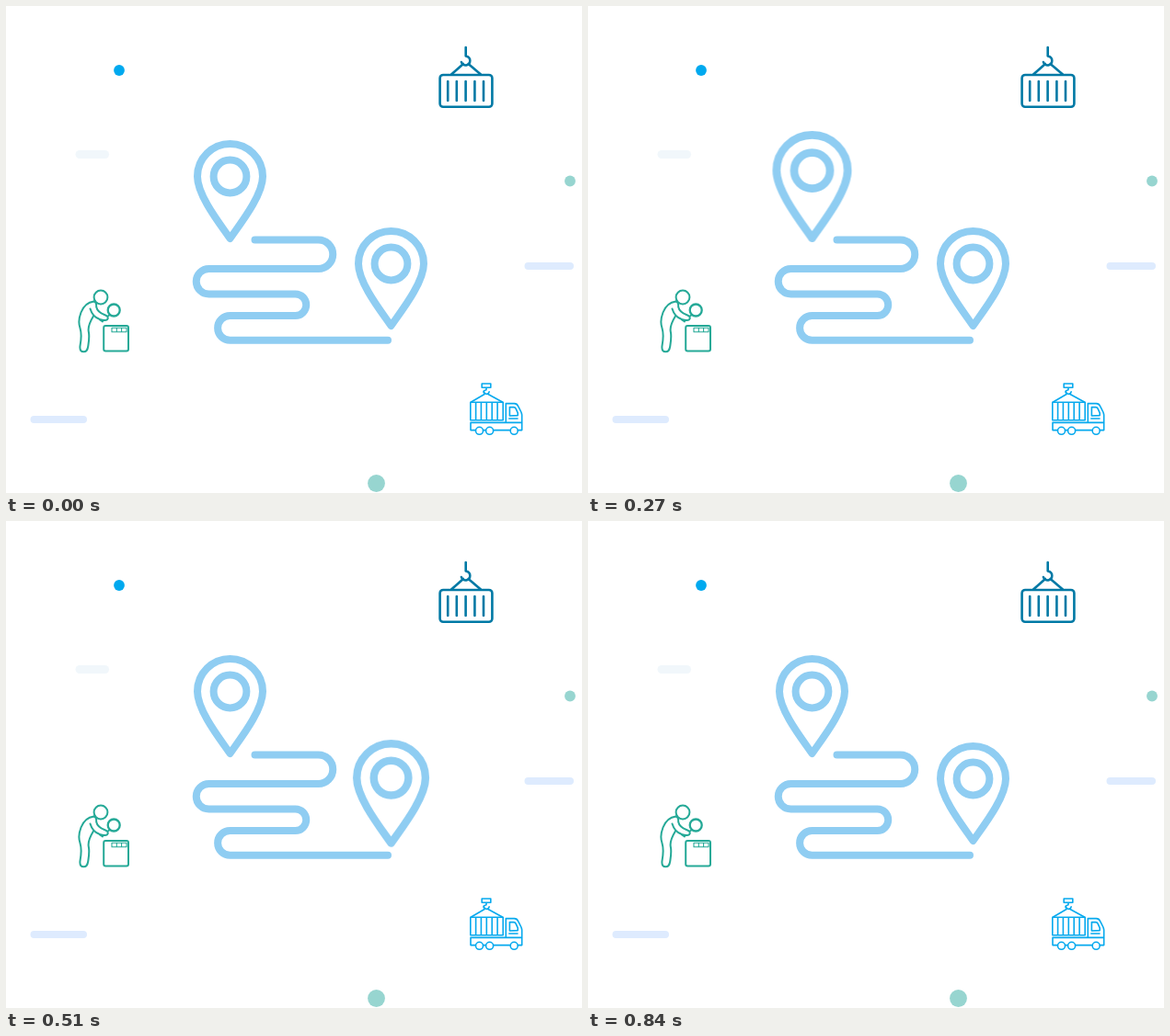
These frames come from a looping animation (626 px wide and 530 px high, 870 ms). An HTML page:

```html
<!DOCTYPE html>
<html lang="en">
<head>
<meta charset="utf-8">
<title>Delivery route</title>
<style>
  html, body { margin: 0; width: 100%; height: 100%; overflow: hidden; background: #fff; }
  svg { display: block; width: 626px; height: 530px; }
  .line { fill: none; stroke-linecap: round; stroke-linejoin: round; }
  .route { stroke: #8fcdf2; stroke-width: 8; }
  .crate { stroke: #0079a5; stroke-width: 2.6; }
  .worker { stroke: #25a997; stroke-width: 2; }
  .truck { stroke: #06a9ee; stroke-width: 1.6; }
  .from, .to { animation: 870ms infinite; }
  .from { transform-origin: 243.5px 257px; animation-name: from; }
  .to { transform-origin: 418.5px 297px; animation-name: to; }

  /* each pulse is half a sine wave: sine-out up, sine-in down */
  @keyframes from {
    0%, 1.72% { transform: scale(1); animation-timing-function: cubic-bezier(.39, .575, .565, 1); }
    24.25% { transform: scale(1.1); animation-timing-function: cubic-bezier(.47, 0, .745, .715); }
    46.8%, 100% { transform: scale(1); }
  }
  @keyframes to {
    0%, 51.15% { transform: scale(1); animation-timing-function: cubic-bezier(.39, .575, .565, 1); }
    73.56% { transform: scale(1.1); animation-timing-function: cubic-bezier(.47, 0, .745, .715); }
    95.98%, 100% { transform: scale(1); }
  }
</style>
</head>
<body>
<svg viewBox="0 0 626 530">
  <defs>
    <g id="pin">
      <path d="M0 67.5C-11.5 51-35.5 20.5-35.5 0a35.5 35.5 0 0 1 71 0C35.5 20.5 11.5 51 0 67.5Z"/>
      <circle r="17.9"/>
    </g>
  </defs>

  <circle cx="123" cy="70" r="5.9" fill="#00a9ef"/>
  <g fill="#97d5d0">
    <circle cx="613" cy="190.5" r="5.9"/>
    <circle cx="402.5" cy="519.5" r="9.4"/>
  </g>
  <rect x="75.5" y="157" width="36.5" height="9" rx="4.5" fill="#f1f7fb"/>
  <g fill="#deebfe">
    <rect x="563.5" y="279" width="53.5" height="8" rx="4"/>
    <rect x="26.5" y="446" width="61.5" height="8" rx="4"/>
  </g>

  <g class="line route">
    <path d="M270.5 254.5H339.5a15.75 15.75 0 0 1 0 31.5H220.5a13.75 13.75 0 0 0 0 27.5H314.5a11.75 11.75 0 0 1 0 23.5H243.5a13.4 13.4 0 0 0 0 26.8H415"/>
    <g class="from"><use href="#pin" x="243.5" y="185.5"/></g>
    <g class="to"><use href="#pin" x="418.5" y="280.5"/></g>
  </g>

  <g class="line crate">
    <rect x="471.6" y="75" width="56.8" height="34.8" rx="3.5"/>
    <path d="M480.2 82v21M489.8 82v21M499.6 82v21M509.4 82v21M519 82v21"/>
    <path d="M484 74.5L497 63M516 74.5L502.5 63"/>
    <path d="M499.7 45v9.5c2.5 .5 4.6 2.2 4.6 5a4.8 4.8 0 0 1-9.4 1.5"/>
  </g>

  <g class="line worker">
    <circle cx="103" cy="317" r="7.4"/>
    <circle cx="117.2" cy="331" r="6.5" stroke-width="2.3"/>
    <path d="M95.5 321.5C88 322.5 84 327 81.5 333.5C79 340 78.5 345 80.5 350.5C82.5 357 82 362 80.5 370C80 374.5 81.5 376.3 84.5 376.3C87.5 376.3 88.6 374.5 89.2 370.5C90 365 91 360 89.8 354.5C88.8 349.5 91 344 95 337.5"/>
    <path d="M95.5 321.5C98.5 322 98.2 325 98.2 327.5C99 331.5 101.5 334 107.5 336.2C111 337.5 111.5 339.8 110 341.2C108 343 104.5 341.8 101.5 340.8C96.5 339 93 334.5 91.5 329.5M110 338l3-2M102 341.5l3 2"/>
    <rect x="106.2" y="348" width="26.8" height="27.5" rx="2"/>
    <path d="M115 350.2h16v4.6h-16zM120.3 350.2v4.6M125.6 350.2v4.6" stroke-width="1.1"/>
  </g>

  <g class="line truck">
    <path d="M517.2 411h9.6v4.2h-9.6zM522 415.5v2.2c-3 .6-3.4 2-2.8 3.2M519.5 419.5c.5 3.8 5 3.6 5.6 .4"/>
    <path d="M505.5 431L520 422.5M539.5 431L524 422.5"/>
    <path d="M504.8 431.2h35.4v19.6h-35.4zM510.6 432v18M516.4 432v18M522.3 432v18M528.2 432v18M534.1 432v18"/>
    <path d="M543.3 453.2V432.6h9.2c2.4 0 3.4 1.2 4.2 3l3.2 6.4c.5 1.2 .8 2.3 .8 3.6v16h-4M547.4 446V436.6h4.4c1.3 0 1.9 .7 2.4 1.8l2 4.4v2.8zM546.8 449h9.2"/>
    <path d="M505 453.4h55.4M505 453.4v8.2h5M518.8 461.6h2.4M530 461.6h17.6"/>
    <circle cx="514.5" cy="462.3" r="4"/>
    <circle cx="525.6" cy="462.3" r="4"/>
    <circle cx="552.2" cy="462.3" r="4"/>
  </g>
</svg>
</body>
</html>
```
